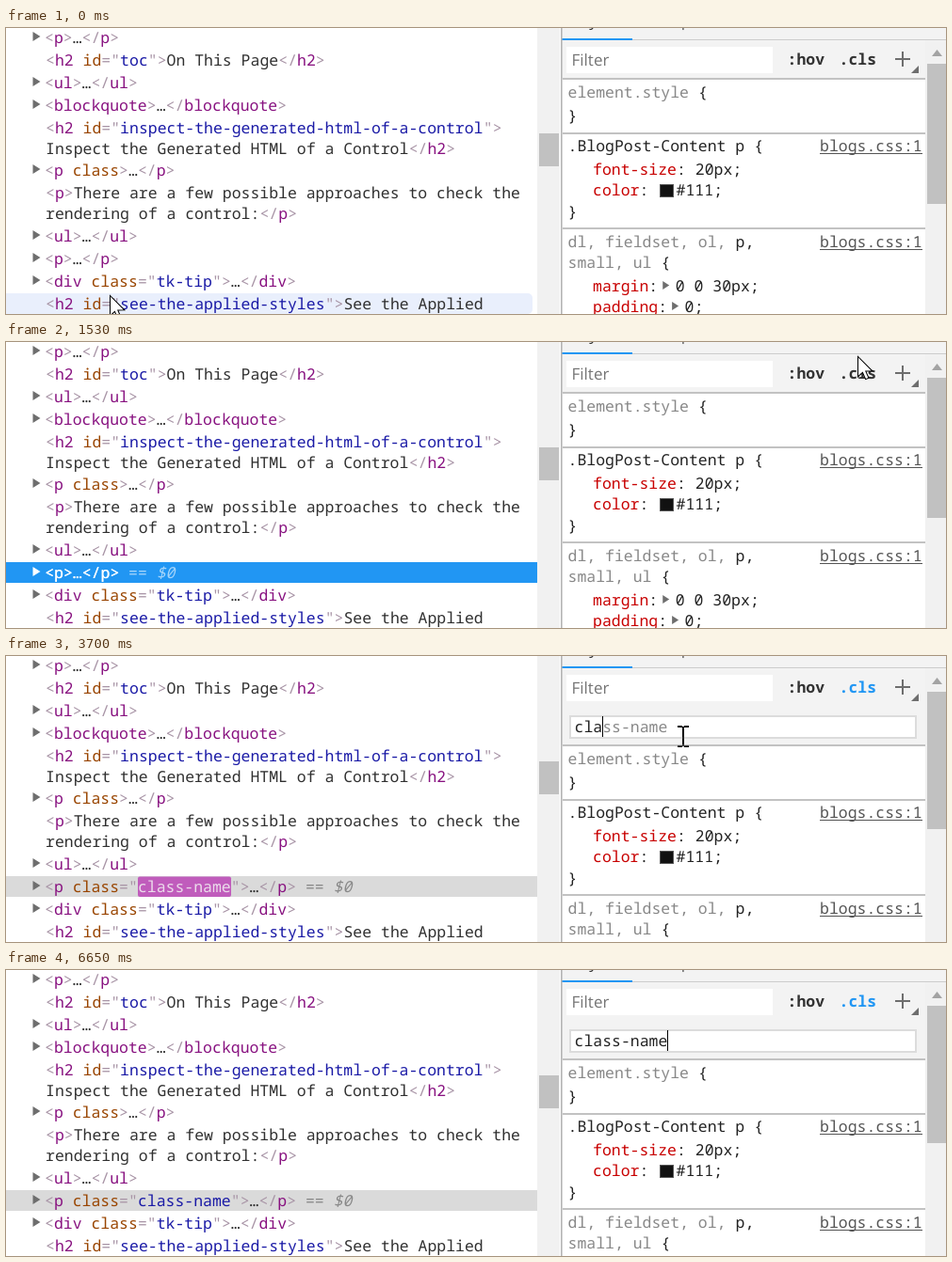
Animation, 998 px wide and 304 px high, one loop 6920 ms. Source, as an HTML page with a canvas:

```html
<!DOCTYPE html>
<html lang="en">
<head>
<meta charset="utf-8">
<title>Adding a class in the inspector</title>
<style>
html, body { margin: 0; width: 100%; height: 100%; overflow: hidden; background: #fff; }
canvas { display: block; }
</style>
</head>
<body>
<canvas id="stage" width="998" height="304"></canvas>
<script>
const ctx = document.getElementById('stage').getContext('2d');
const LOOP = 6920;
const CW = 9.89;
const MONO = '16.48px "Noto Sans Mono", monospace';
const SANS = '17px "Open Sans", sans-serif';
const BLUE = '#2196f3', INK = '#222', GRAY = '#888', BAR = '#f3f3f3', LINE = '#c2c2c2', THUMB = '#c1c1c1';
const C = { bracket: '#a894a6', tag: '#881280', attr: '#994500', value: '#1a1aa6', text: '#303030' };

// [baseline, markup, expandable]
const ROWS = [
  [16, '<p>…</p>', 1],
  [40, '<h2 id="toc">On This Page</h2>'],
  [64, '<ul>…</ul>', 1],
  [88, '<blockquote>…</blockquote>', 1],
  [112, '<h2 id="inspect-the-generated-html-of-a-control">'],
  [134, 'Inspect the Generated HTML of a Control</h2>'],
  [157, '<p class>…</p>', 1],
  [181, '<p>There are a few possible approaches to check the'],
  [203, 'rendering of a control:</p>'],
  [227, '<ul>…</ul>', 1],
  [275, '<div class="tk-tip">…</div>', 1],
  [299, '<h2 id="see-the-applied-styles">See the Applied']
];
const LEAF_X = 42, NODE_X = 41;
const WORDS = ['cdata', 'cell', 'char', 'chrome23-bugfix', 'class-name', 'clearfix', 'code', 'code-sample'];

// [time, x, y], each position held until the next
const POINTER = [
  [0, 110, 284], [70, 109, 279], [150, 107, 272], [220, 106, 266], [290, 105, 262],
  [440, 102, 255], [530, 101, 251], [760, 150, 238], [840, 310, 186], [910, 520, 120],
  [990, 720, 62], [1070, 860, 20], [1140, 919, 3], [1220, 914, 8], [1370, 910, 10],
  [1450, 906, 13], [1530, 904, 15], [1610, 897, 26], [1690, 870, 33], [1760, 779, 33],
  [1910, 752, 60], [1990, 742, 76], [2070, 735, 86], [2150, 731, 90], [2230, 718, 93]
];
// [time, typed letters]
const KEYS = [[0, 0], [3150, 1], [3380, 2], [3700, 3], [3940, 4], [4180, 5], [4560, 6],
  [5020, 7], [5180, 8], [5400, 9], [5570, 10]];

const held = (list, t) => list.reduce((a, k) => (k[0] <= t ? k : a));
const between = (t, a, b) => t >= a && t < b;
const mix = (a, b, f) => `rgb(${a.map((v, i) => Math.round(v + (b[i] - v) * f))})`;

function rect(x, y, w, h, color) {
  ctx.fillStyle = color;
  ctx.fillRect(x, y, w, h);
}

function round(x, y, w, h, r, color) {
  ctx.fillStyle = color;
  ctx.beginPath();
  ctx.roundRect(x, y, w, h, r);
  ctx.fill();
}

function poly(color, ...pts) {
  ctx.fillStyle = color;
  ctx.beginPath();
  for (let i = 0; i < pts.length; i += 2) ctx.lineTo(pts[i], pts[i + 1]);
  ctx.closePath();
  ctx.fill();
}

const divider = y => rect(591, y, 385, 2, LINE);

// Draws a string on the character grid and returns the next x
function put(s, x, y, color, style = '') {
  ctx.font = style + ' ' + MONO;
  ctx.fillStyle = color;
  ctx.fillText(s, x, y);
  return x + s.length * CW;
}

function markup(s, x, y, only) {
  let state = 'text';
  const out = (part, kind) => { x = put(part, x, y, only || C[kind]); };
  for (const part of s.match(/<\/?|>|="|"|[^<>="]+/g)) {
    if (part[0] === '<') { out(part, 'bracket'); state = 'tag'; }
    else if (part === '>') { out(part, 'bracket'); state = 'text'; }
    else if (part === '="') { out(part, 'bracket'); state = 'value'; }
    else if (part === '"') { out(part, 'bracket'); state = 'attr'; }
    else if (state === 'tag') {
      const [name, attr] = part.split(' ');
      out(name, 'tag');
      if (attr) out(' ' + attr, 'attr');
    } else out(part, state);
  }
  return x;
}

const expander = (y, color) => poly(color, 28.5, y - 12, 36.5, y - 7, 28.5, y - 2);

function selectedRow(t) {
  const y = 251;
  const active = between(t, 680, 1910);
  if (t >= 680) rect(0, 234, 564, 22, active ? BLUE : '#dadada');
  expander(y, active ? '#fff' : '#6e6e6e');
  const hasClass = t >= 3550;
  let x = markup(hasClass ? '<p class="class-name">…</p>' : '<p>…</p>', NODE_X, y, active && '#fff');
  if (active) markup('<p>…</p>', NODE_X + 0.4, y, '#fff');
  if (t >= 680) {
    x = put(' == ', x, y, active ? '#a6d5fa' : GRAY);
    put('$0', x, y, active ? '#a6d5fa' : GRAY, 'italic');
  }
  if (hasClass && t < 5250) {
    const f = (t - 3550) / 1700;
    round(140, 234.5, 99, 21.5, 2, mix([190, 80, 185], [218, 218, 218], f));
    put('class-name', NODE_X + 10 * CW, y, mix([235, 220, 235], [26, 26, 166], Math.max(0, (f - 0.45) / 0.55)));
  }
}

function tree(t, py) {
  rect(0, 0, 588, 304, '#fff');
  if (t < 680) {
    const top = py > 280 ? 282 : py > 257 ? 258 : 234;
    round(0, top, 559, 22, [0, 5, 5, 0], '#e9effc');
  }
  for (const [y, s, open] of ROWS) {
    if (open) expander(y, '#6e6e6e');
    markup(s, open ? NODE_X : LEAF_X, y);
  }
  selectedRow(t);
  rect(564, 0, 25, 304, '#f1f1f1');
  rect(566, 112, 21, 35, THUMB);
}

function source(y) {
  put('blogs.css:1', 864, y, '#555');
  rect(864, y + 2, 109, 1, '#555');
}

function prop(name, value, y, mark) {
  const x = put(name, 623, y, '#c80000');
  const end = put(':', x, y, INK);
  if (mark === 'swatch') {
    rect(694, y - 12, 15, 14, '#555');
    rect(695, y - 11, 13, 12, '#111');
    put(value, 711.5, y, INK);
  } else if (mark) {
    poly('#6e6e6e', end + 5, y - 11, end + 12, y - 6.5, end + 5, y - 2);
    put(value, end + 18.5, y, INK);
  } else put(value, end + CW, y, INK);
}

function rules(dy) {
  ctx.save();
  ctx.translate(0, dy);
  put('{', put('element.style ', 596.5, 74, GRAY), 74, INK);
  put('}', 596.5, 99, INK);
  divider(111);
  put('.BlogPost-Content p {', 596.5, 131, INK);
  source(131);
  prop('font-size', '20px;', 156);
  prop('color', '#111;', 178, 'swatch');
  put('}', 596.5, 201, INK);
  divider(212);
  put('p,', put('dl, fieldset, ol, ', 596.5, 233, GRAY), 233, INK);
  source(233);
  put('{', put('small, ul ', 596.5, 255, GRAY), 255, INK);
  prop('margin', '0 0 30px;', 280, 'arrow');
  prop('padding', '0;', 302, 'arrow');
  ctx.restore();
}

function toolbar(open) {
  rect(590, 0, 408, 54, BAR);
  ctx.font = SANS;
  ctx.fillStyle = '#333';
  ctx.fillText('Styles', 604, -2);
  ctx.fillStyle = '#5a5a5a';
  ctx.fillText('Computed', 680, -2);
  rect(590, 12, 408, 1, '#ccc');
  rect(590, 11, 75, 2, BLUE);
  rect(595, 20, 219, 28, '#fff');
  ctx.font = SANS;
  ctx.fillStyle = '#757575';
  ctx.fillText('Filter', 600.5, 40);
  put(':hov', 829.5, 39, '#333', 'bold');
  put('.cls', 884.5, 39, open ? BLUE : '#333', 'bold');
  rect(944, 32, 16, 2, '#6e6e6e');
  rect(951, 25, 2, 16, '#6e6e6e');
  poly('#6e6e6e', 969, 40, 969, 48, 961, 48);
}

function popup(words, prefix, width, scrolls) {
  const h = words.length * 28;
  ctx.save();
  ctx.shadowColor = 'rgba(0,0,0,.4)';
  ctx.shadowBlur = 3;
  rect(599, 91, width, h + 1, '#fff');
  ctx.restore();
  rect(600, 91, scrolls ? 196 : width - 1, 28, BLUE);
  words.forEach((word, i) => {
    const color = i ? INK : '#fff', y = 111 + i * 28;
    const x = put(word.slice(0, prefix), 602, y, color, 'bold');
    put(word.slice(prefix), x, y, color);
  });
  if (scrolls) {
    rect(797, 91, 24, h, '#f1f1f1');
    rect(798, 116, 21, 160, THUMB);
    poly('#a3a3a3', 803, 108, 809, 101, 815, 108);
  }
}

function classPane(t) {
  rect(590, 54, 386, 41, BAR);
  divider(94);
  rect(598, 63, 369, 25, '#dcdcdc');
  rect(600, 65, 365, 21, '#fff');
  const n = held(KEYS, t)[1];
  const x = 603.5, y = 81;
  if (!n) put('Add new class', x, y, '#757575');
  else {
    const word = t < 3380 ? 'cdata' : 'class-name';
    const next = put(word.slice(0, n), x, y, INK);
    if (t >= 3230) put(word.slice(n), next, y, GRAY);
  }
  if (!between(t, 2690, 3150) && !between(t, 6120, 6650)) {
    rect(Math.floor(x + n * CW), 64, 1, 22, '#000');
  }
  if (between(t, 3230, 3470)) popup(WORDS, 1, 223, true);
  else if (between(t, 3470, 3700)) popup(['class-name', 'clearfix'], 2, 163, false);
}

function panel(t) {
  const open = t >= 1910;
  rect(588, 0, 410, 304, '#fff');
  rules(open ? 41 : 0);
  toolbar(open);
  rect(976, 13, 22, 291, '#f1f1f1');
  rect(978, 38, 20, open ? 146 : 149, THUMB);
  poly('#a3a3a3', 983, 30, 988.5, 23, 994, 30);
  if (open) classPane(t);
  else divider(53);
  rect(589, 0, 1.6, 304, '#b4b4b4');
}

function arrow(x, y) {
  ctx.save();
  ctx.translate(x + 0.5, y + 0.5);
  ctx.scale(1.3, 1.3);
  ctx.lineWidth = 0.8;
  ctx.strokeStyle = '#000';
  poly('#fff', 0, 0, 0, 16.5, 3.8, 13, 6.3, 18.6, 8.8, 17.5, 6.4, 12, 11.8, 11.8);
  ctx.stroke();
  ctx.restore();
}

// Inverts whatever is underneath
function beam() {
  ctx.save();
  ctx.globalCompositeOperation = 'difference';
  rect(713, 74, 5, 2, '#fff');
  rect(720, 74, 5, 2, '#fff');
  rect(718, 75, 2, 21, '#fff');
  rect(713, 95, 5, 2, '#fff');
  rect(720, 95, 5, 2, '#fff');
  ctx.restore();
}

function draw(t) {
  const [, px, py] = held(POINTER, t);
  tree(t, py);
  panel(t);
  if (t < 2540) arrow(px, py);
  else if (t < 5950) beam();
}

ctx.textRendering = 'geometricPrecision';
const start = performance.now();
function tick() {
  draw((performance.now() - start) % LOOP);
  requestAnimationFrame(tick);
}
tick();
</script>
</body>
</html>
```
